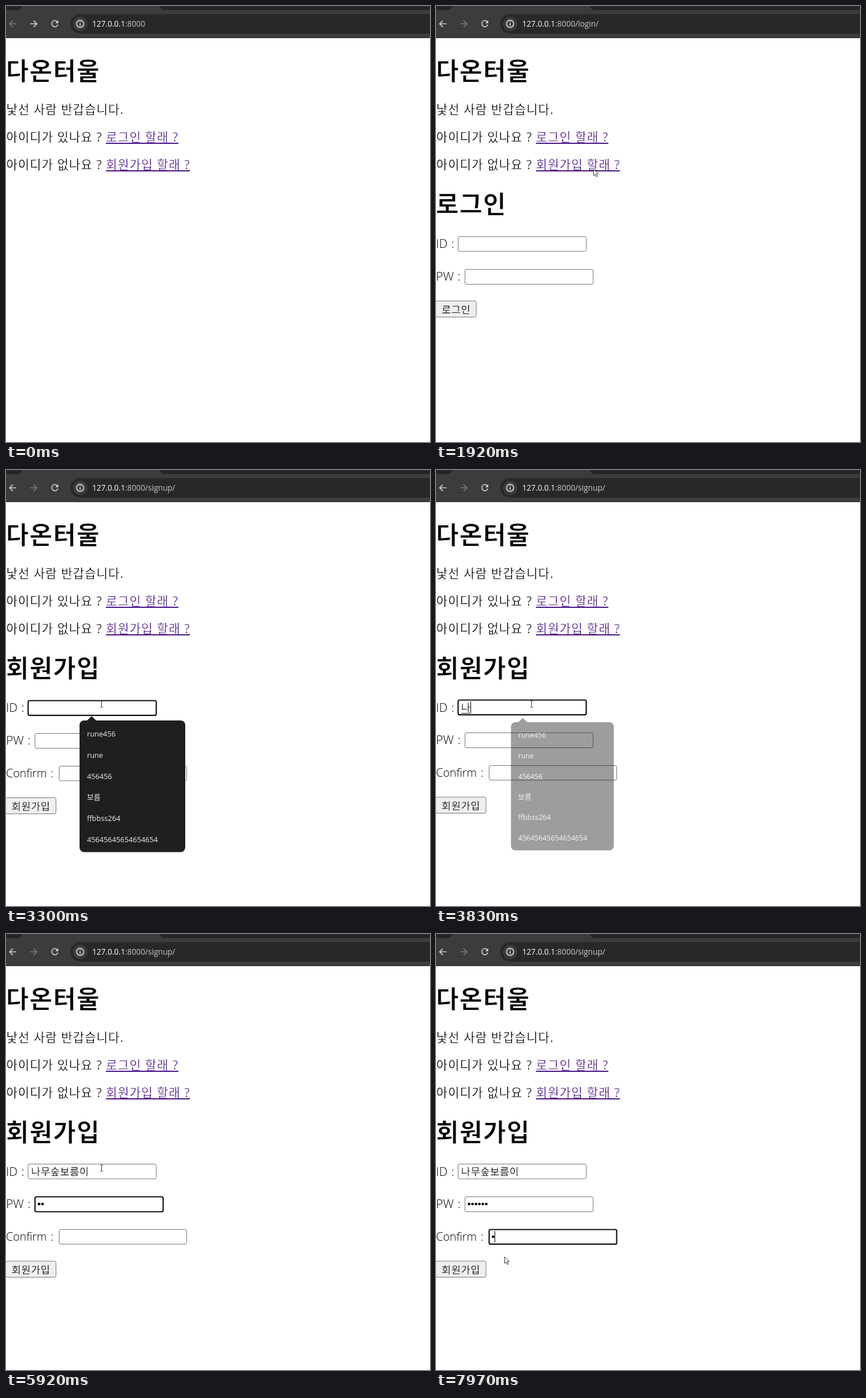
Write an HTML page that moves like this. It is 738x759 px and loops after 8000 ms.

```html
<!DOCTYPE html>
<html lang="ko">
<head>
<meta charset="utf-8">
<title>다온터울</title>
<style>
html, body { margin: 0; width: 100%; height: 100%; overflow: hidden; background: #fff; }
svg { display: block; width: 738px; height: 759px; }
text { font-family: "Open Sans", "Noto Sans CJK KR", "Noto Sans CJK", sans-serif; }
/* a thin background-coloured stroke slims the Korean letters */
.h { font-size: 43px; font-weight: 700; letter-spacing: 1.4px; stroke: #fff; stroke-width: .7; }
.p { font-size: 21.2px; letter-spacing: 1px; word-spacing: .3px; stroke: #fff; stroke-width: .35; }
.link { fill: #4b1486; }
.lab { font-size: 21px; font-weight: 360; word-spacing: 1.2px; }
.in { font-size: 17.6px; letter-spacing: .65px; stroke: #fff; stroke-width: .25; }
.cap { stroke: #efefef; }
.url { font-size: 13.6px; fill: #c9c9c9; }
.opt { font-size: 12.7px; fill: #eee; }
.box { fill: #fff; stroke: #767676; stroke-width: 1; }
.box.on { stroke: #101010; stroke-width: 2.2; }
.btn { fill: #efefef; stroke: #767676; }
.ico { fill: none; stroke: #d2d2d2; stroke-width: 1.7; }
.dim { stroke: #7c7c7c; }
</style>
</head>
<body>
<svg viewBox="0 0 738 759">
  <rect width="738" height="56" fill="#3c3c3c"/>
  <path d="M0 0H28Q27 7 20 7H0ZM268 0H738V7H277Q269 7 268 0Z" fill="#242625"/>
  <rect x="112" y="14" width="660" height="34" rx="17" fill="#282828"/>
  <path id="back" class="ico" d="M18 31H6.5M12 25.3L6.3 31L12 36.7"/>
  <path id="fwd" class="ico" d="M42 31H53.5M48 25.3L53.7 31L48 36.7"/>
  <path class="ico" d="M89.6 27.6A5.4 5.4 0 1 0 90.3 32.3"/>
  <path d="M91 24.8V30H85.8Z" fill="#d2d2d2"/>
  <circle cx="129" cy="31" r="12.5" fill="#3c3c3c"/>
  <circle cx="129" cy="31" r="6.2" fill="none" stroke="#eee" stroke-width="1.5"/>
  <path d="M129 30V34.5M129 27.3V28.9" stroke="#eee" stroke-width="1.6"/>
  <text class="url" x="150" y="36"><tspan fill="#fff">127.0.0.1</tspan>:8000<tspan id="path"></tspan></text>

  <text class="h" x="0" y="128.5">다온터울</text>
  <text class="p" x=".5" y="188">낯선 사람 반갑습니다.</text>
  <text class="p" x=".5" y="236">아이디가 있나요 ?</text>
  <text class="p link" x="174" y="236">로그인 할래 ?</text>
  <text class="p" x=".5" y="284">아이디가 없나요 ?</text>
  <text class="p link" x="174" y="284">회원가입 할래 ?</text>
  <path d="M174 239H300M174 287H320" stroke="#4b1486" stroke-width="2"/>

  <g id="form">
    <text id="title" class="h" x="0" y="360.5"></text>
    <text class="lab" x="0" y="420.5">ID :</text>
    <g id="rows">
      <text class="lab" x="0" y="478">PW :</text>
      <rect id="id" class="box" x="38.5" y="401.5" width="223" height="25.6" rx="2.5"/>
      <rect id="pw" class="box" x="50.5" y="458.5" width="223" height="26" rx="2.5"/>
      <g id="extra">
        <text class="lab" x="0" y="535" style="font-size:19.7px;word-spacing:2px">Confirm :</text>
        <rect id="cf" class="box" x="92.5" y="515.5" width="222" height="25.4" rx="2.5"/>
      </g>
      <g id="button">
        <rect id="face" class="btn" x="-.5" y="513.5" height="28" rx="3"/>
        <text id="cap" class="in cap" x="9.8" y="534.5"></text>
      </g>
      <text id="typed" class="in" x="43.7" y="421"></text>
      <path id="under" stroke="#222"/>
      <g id="dots"></g>
      <path id="caret" stroke="#000"/>
    </g>
  </g>

  <g id="popup">
    <rect x="128" y="438" width="184" height="229" rx="8" fill="#000" opacity=".12"/>
    <path d="M140 437L149 428.5L158 437Z" fill="#1f1f1f"/>
    <rect x="128" y="436" width="184" height="229" rx="8" fill="#1f1f1f"/>
  </g>

  <g id="arrow">
    <path d="M0 0V11.4L2.6 9L4.5 13.3L6.4 12.5L4.6 8.3H8Z" fill="#fff" stroke="#222" stroke-width=".9"/>
  </g>
  <g id="beam">
    <path d="M-2.5 -5.5H-.7L0 -5L.7 -5.5H2.5M0 -5V5M-2.5 5.5H-.7L0 5L.7 5.5H2.5" fill="none" stroke="#333" stroke-width="1"/>
  </g>
  <g id="hand">
    <path d="M-1.2 8V1Q0 -.8 1.2 1V5.2Q2.6 4.4 3.6 5.6Q5 5 5.8 6.3Q7.4 6 7.5 7.6V10.5Q7.2 13 6 14.5H-.4L-4 9.4Q-3.6 7.6 -1.2 9.4Z" fill="#fff" stroke="#222" stroke-width=".9"/>
  </g>
</svg>
<script>
const LOOP = 8000, STEP = 70, BLINK = 460;
const LOGIN = 1380, SIGNUP = 2340, FOCUS_ID = 2750, FOCUS_PW = 5060, FOCUS_CF = 7630;
const NS = 'http://www.w3.org/2000/svg';
const el = id => document.getElementById(id);
const show = (id, on) => { el(id).style.display = on ? '' : 'none'; };
const set = (id, name, value) => el(id).setAttribute(name, value);

// syllables as the input method composes them: [time, text]
const KEYS = [[3760, 'ㄴ'], [3830, '나'], [3970, '남'], [4040, '나무'], [4110, '나뭇'],
  [4180, '나무수'], [4250, '나무숲'], [4450, '나무숲ㅂ'], [4520, '나무숲보'], [4590, '나무숲볼'],
  [4660, '나무숲보르'], [4730, '나무숲보름'], [4800, '나무숲보름ㅇ'], [4870, '나무숲보름이']];
const PW_KEYS = [5390, 5460, 6720, 6860, 7000, 7210];
const CF_KEYS = [7910];

// pointer legs: start, end, from, to
const LEGS = [
  [70, 830, 686, 686, 315, 236],
  [900, 1180, 308, 233, 268, 231],
  [1850, 1920, 270, 250, 274.5, 284],
  [1990, 2130, 272, 279, 262, 274],
  [2400, 2610, 256, 288, 192, 384],
  [2680, 2750, 176, 402, 166.5, 407.5],
  [6400, 6470, 166.5, 407.5, 165.5, 411],
  [6650, 7420, 164, 418, 136, 543],
  [7490, 7770, 132, 548, 119.5, 562]
];

function add(parent, tag, attrs, text) {
  const node = document.createElementNS(NS, tag);
  for (const k in attrs) node.setAttribute(k, attrs[k]);
  if (text) node.textContent = text;
  return el(parent).appendChild(node);
}

['rune456', 'rune', '456456', '보름', 'ffbbss264', '45645645654654654'].forEach((s, i) =>
  add('popup', 'text', { class: 'opt', x: 141, y: 464 + i * 36.75 }, s));

const pwDots = PW_KEYS.map((_, i) => add('dots', 'circle', { cx: 57.5 + 6 * i, cy: 471, r: 2.35 }));
const cfDots = CF_KEYS.map((_, i) => add('dots', 'circle', { cx: 99.5 + 6 * i, cy: 528, r: 2.35 }));

function pointerAt(t) {
  const leg = LEGS.filter(l => l[0] <= t).pop();
  if (!leg) return null;
  const [a, b, x0, y0, x1, y1] = leg;
  const p = Math.min(1, Math.floor((t - a) / STEP) * STEP / (b - a));
  const e = p * p * (3 - 2 * p);
  return [x0 + (x1 - x0) * e, y0 + (y1 - y0) * e];
}

const inside = ([x, y], l, t, r, b) => x >= l && x <= r && y >= t && y <= b;

function pointerKind(pos, t) {
  if (inside(pos, 174, 217, 300, 240) || inside(pos, 174, 265, 320, 283)) return 'hand';
  const fields = [[38, 400, 262, 428], [50, 457, 274, 485], [92, 514, 315, 541]];
  return t >= SIGNUP && fields.some(f => inside(pos, ...f)) ? 'beam' : 'arrow';
}

function drawPointer(t) {
  const pos = pointerAt(t), kind = pos && pointerKind(pos, t);
  for (const id of ['arrow', 'beam', 'hand']) show(id, id === kind);
  if (pos) set(kind, 'transform', `translate(${pos})`);
}

function drawPage(t) {
  const login = t >= LOGIN, signup = t >= SIGNUP;
  el('path').textContent = signup ? '/signup/' : login ? '/login/' : '';
  set('back', 'class', login ? 'ico' : 'ico dim');
  set('fwd', 'class', login ? 'ico dim' : 'ico');
  show('form', login);
  show('extra', signup);
  el('title').textContent = el('cap').textContent = signup ? '회원가입' : '로그인';
  set('face', 'width', signup ? 87.5 : 70.5);
  set('button', 'transform', `translate(0 ${signup ? 57 : 0})`);
  set('rows', 'transform', `translate(0 ${t >= KEYS[0][0] ? -1 : 0})`);
}

function drawInput(t) {
  const focus = t >= FOCUS_CF ? 'cf' : t >= FOCUS_PW ? 'pw' : t >= FOCUS_ID ? 'id' : '';
  for (const id of ['id', 'pw', 'cf']) set(id, 'class', id === focus ? 'box on' : 'box');

  const key = KEYS.filter(k => k[0] <= t).pop();
  const word = key ? key[1] : '';
  el('typed').textContent = word;
  const end = 43.5 + 16.84 * word.length;
  show('under', word && focus === 'id');
  set('under', 'd', `M${end - 16.3} 424.5H${end - .5}`);

  const pressed = list => list.filter(k => k <= t).length;
  const n = pressed(PW_KEYS), m = pressed(CF_KEYS);
  pwDots.forEach((d, i) => { d.style.display = i < n ? '' : 'none'; });
  cfDots.forEach((d, i) => { d.style.display = i < m ? '' : 'none'; });

  const [x, y] = { id: [Math.floor(end) + .5, 404], pw: [54.5 + 6 * n, 461], cf: [96.5 + 6 * m, 518] }[focus] || [0, 0];
  const events = [FOCUS_ID + 90, FOCUS_PW, FOCUS_CF, ...KEYS.map(k => k[0]), ...PW_KEYS, ...CF_KEYS];
  const last = Math.max(FOCUS_ID, ...events.filter(e => e <= t));
  show('caret', focus && Math.floor((t - last) / BLINK) % 2 === 0);
  set('caret', 'd', `M${x} ${y}v20`);
}

function drawPopup(t) {
  const rise = (t - 2780) / 100, fall = (3900 - t) / 160;
  const a = Math.max(0, Math.min(1, rise, t < 3830 ? 1 : fall));
  const s = .953 + .047 * a;
  show('popup', a > 0);
  set('popup', 'opacity', a);
  set('popup', 'transform', `translate(220 550) scale(${s}) translate(-220 -550)`);
}

function frame(now) {
  const t = now % LOOP;
  drawPage(t);
  drawInput(t);
  drawPopup(t);
  drawPointer(t);
  requestAnimationFrame(frame);
}
frame(0);
</script>
</body>
</html>
```
